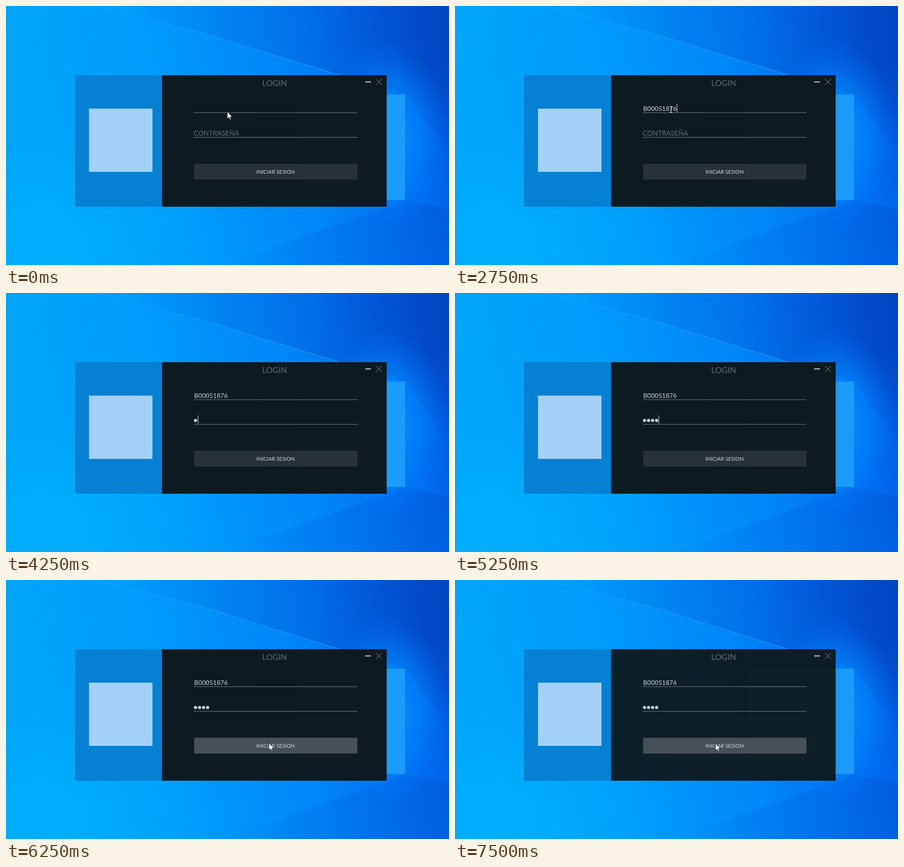
Animation, 977 px wide and 573 px high, one loop 8 s. Source, as an HTML page:

```html
<!DOCTYPE html>
<html lang="es">
<head>
<meta charset="utf-8">
<title>Login</title>
<style>
  html, body { margin: 0; width: 100%; height: 100%; overflow: hidden; background: #0090ff; }
  svg { display: block; width: 977px; height: 573px; }
  text { font-family: Lato, "Open Sans", sans-serif; }
  .rule { stroke: #7d888c; }
  .hint { fill: #606b70; }
  .glyph { fill: none; }
</style>
</head>
<body>
<svg viewBox="0 0 977 573">
  <defs>
    <linearGradient id="sky" x1="0" y1=".15" x2="1" y2="0">
      <stop offset="0" stop-color="#00a6f9"/>
      <stop offset=".3" stop-color="#009cfb"/>
      <stop offset=".6" stop-color="#0086f8"/>
      <stop offset=".85" stop-color="#006aee"/>
      <stop offset="1" stop-color="#0054d6"/>
    </linearGradient>
    <linearGradient id="upper">
      <stop offset=".1" stop-color="#0048c4" stop-opacity="0"/>
      <stop offset=".6" stop-color="#0048c4" stop-opacity=".28"/>
      <stop offset="1" stop-color="#0440b8" stop-opacity=".75"/>
    </linearGradient>
    <linearGradient id="fade" x2="0" y2="1">
      <stop offset=".4" stop-color="#fff"/>
      <stop offset="1" stop-color="#000"/>
    </linearGradient>
    <mask id="soft"><rect width="977" height="330" fill="url(#fade)"/></mask>
    <linearGradient id="lower">
      <stop offset="0" stop-color="#0050d0" stop-opacity="0"/>
      <stop offset="1" stop-color="#0050d0" stop-opacity=".4"/>
    </linearGradient>
    <linearGradient id="ray">
      <stop offset="0" stop-color="#4cc0ff" stop-opacity=".2"/>
      <stop offset="1" stop-color="#4cc0ff" stop-opacity=".4"/>
    </linearGradient>
    <radialGradient id="glow">
      <stop offset="0" stop-color="#0a9cff" stop-opacity=".9"/>
      <stop offset=".6" stop-color="#0088ff" stop-opacity=".5"/>
      <stop offset="1" stop-color="#0070ff" stop-opacity="0"/>
    </radialGradient>
    <radialGradient id="corner">
      <stop offset="0" stop-color="#00b2ff" stop-opacity=".7"/>
      <stop offset="1" stop-color="#00b2ff" stop-opacity="0"/>
    </radialGradient>
  </defs>

  <rect width="977" height="573" fill="url(#sky)"/>
  <ellipse cx="90" cy="520" rx="380" ry="230" fill="url(#corner)"/>
  <path d="M200 0 L440 62 L735 153 L880 195 L977 330 V0Z" fill="url(#upper)" mask="url(#soft)"/>
  <path d="M480 573 L880 430 L977 450 V573Z" fill="url(#lower)"/>
  <ellipse cx="835" cy="290" rx="140" ry="215" fill="url(#glow)"/>
  <path d="M200 0 L440 62 L735 153" fill="none" stroke="url(#ray)" stroke-width="1.5"/>
  <rect x="647" y="196" width="233" height="233" fill="#1b9cfa"/>

  <rect x="152" y="153" width="192" height="291" fill="#0580d3"/>
  <rect x="183" y="227" width="140" height="140" fill="#a3d0f6"/>
  <rect id="panel" x="344" y="153" width="495.5" height="291" fill="#0e1618"/>

  <text class="hint" x="592.5" y="177" font-size="18" text-anchor="middle">LOGIN</text>
  <path class="glyph" d="M792 168H805" stroke="#cfd6d9" stroke-width="2"/>
  <path class="glyph" d="M816 161.5L829 174.5M829 161.5L816 174.5" stroke="#98a1a5"/>

  <path class="rule" d="M414 236H775M414 290.5H775"/>
  <text id="user" x="415" y="232" font-size="14" fill="#cdd5d8">B00051876</text>
  <text id="hint" class="hint" x="414" y="287" font-size="15">CONTRASEÑA</text>
  <g id="dots" fill="#c3d8df"></g>
  <rect id="caret" width="1" height="18" fill="#e8eef0"/>

  <rect id="button" x="415" y="349" width="360" height="35"/>
  <text x="594.5" y="370.5" font-size="11.5" fill="#d3d9dc" text-anchor="middle">INICIAR SESION</text>

  <path id="arrow" d="M0 0V15.5L3.7 12.2L6.2 17.4L8.7 16.3L6.2 11.2H11Z" fill="#fff" stroke="#000" stroke-width=".8"/>
  <path id="beam" d="M-3 -6.5H-1L0 -5.5L1 -6.5H3M0 -5.5V5.5M-3 6.5H-1L0 5.5L1 6.5H3" fill="none" stroke="#f2f5f6" stroke-width="1.1"/>
</svg>
<script>
const LOOP = 8000;
const start = {
  arrow: [488, 234], beam: null, caret: null,
  user: false, hint: true, dots: 0, hover: false, alpha: .96
};
const steps = [
  [250, { arrow: null, beam: [476.5, 232] }],
  [1750, { caret: [414, 217] }],
  [2500, { caret: null }],
  [2750, { user: true, caret: [489, 217], beam: [476.5, 229] }],
  [3000, { beam: [474.5, 254] }],
  [3250, { beam: [468.5, 286] }],
  [3500, { hint: false, caret: [414, 271], beam: [466.5, 285] }],
  [4250, { dots: 1, caret: [423, 271], beam: null }],
  [4750, { dots: 2, caret: [431, 271] }],
  [5000, { dots: 3, caret: [440, 271] }],
  [5250, { dots: 4, caret: [449, 271] }],
  [5750, { caret: null }],
  [6000, { arrow: [589.5, 329] }],
  [6250, { arrow: [580, 361], hover: true }],
  [6500, { arrow: [574.5, 362], caret: [449, 271] }],
  [6750, { caret: null }],
  [7500, { alpha: .93 }]
];

const el = id => document.getElementById(id);
const show = (node, on) => node.setAttribute("visibility", on ? "visible" : "hidden");
const place = (id, pos) => {
  show(el(id), pos);
  if (pos) el(id).setAttribute("transform", `translate(${pos})`);
};

for (let i = 0; i < 4; i++) {
  const dot = document.createElementNS("http://www.w3.org/2000/svg", "circle");
  dot.setAttribute("cx", 418 + i * 8.9);
  dot.setAttribute("cy", 282);
  dot.setAttribute("r", 3.5);
  el("dots").append(dot);
}

function draw(time) {
  const state = { ...start };
  for (const [at, change] of steps) if (time >= at) Object.assign(state, change);
  for (const id of ["arrow", "beam", "caret"]) place(id, state[id]);
  for (const id of ["user", "hint"]) show(el(id), state[id]);
  [...el("dots").children].forEach((dot, i) => show(dot, i < state.dots));
  el("button").setAttribute("fill", state.hover ? "#465056" : "#263138");
  el("panel").setAttribute("fill-opacity", state.alpha);
}

const begin = performance.now();
function tick() {
  draw((performance.now() - begin) % LOOP);
  requestAnimationFrame(tick);
}
tick();
</script>
</body>
</html>
```
